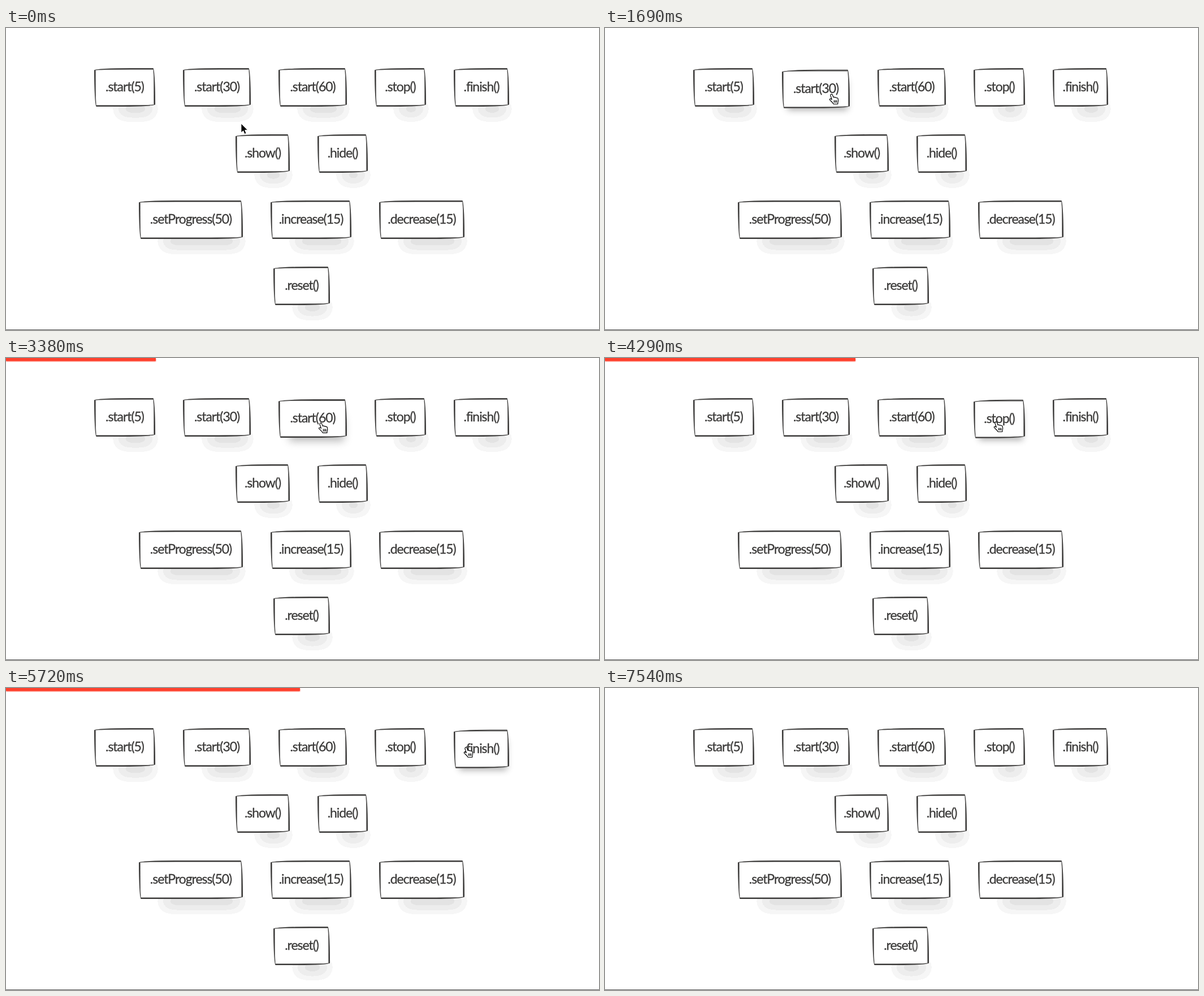
An HTML page for the animation above (7800 ms loop, 1049x534 px).

```html
<!DOCTYPE html>
<html lang="en">
<head>
<meta charset="utf-8">
<title>Progress bar buttons</title>
<style>
  html, body { margin: 0; width: 100%; height: 100%; overflow: hidden; background: #fff; }
  #stage { position: relative; width: 1049px; height: 534px; overflow: hidden; background: #fff; }
  #stage > * { position: absolute; }
  .shade, .btn {
    box-sizing: border-box; height: 68px;
    border-radius: 255px 15px 225px 15px / 15px 225px 15px 255px;
  }
  .btn {
    border: 2px solid #3b3a39; box-shadow: inset 0 0 0 .6px #3b3a39;
    background: #fff; color: #3b3a39;
    font: 23px/60px Lato, "Open Sans", sans-serif; letter-spacing: -1.05px;
    -webkit-text-stroke: .3px #3b3a39;
    text-align: center; white-space: nowrap;
  }
  #rule { left: 0; top: 533px; width: 100%; height: 1px; background: #5c5c5c; }
  #bar { left: 0; top: 0; height: 5px; background: #fe412d; box-shadow: 0 1px 2px #fe412d; }
  #cursor { left: 0; top: 0; overflow: visible; }
</style>
</head>
<body>
<div id="stage">
  <svg width="0" height="0">
    <filter id="bands" x="-100" y="-100" width="500" height="300" filterUnits="userSpaceOnUse">
      <feComponentTransfer><feFuncA id="levels" type="discrete"/></feComponentTransfer>
    </filter>
  </svg>
  <div id="rule"></div>
  <div id="bar"></div>
  <svg id="cursor" width="20" height="22" stroke-linejoin="round">
    <path id="arrow" fill="#000" stroke="#fff" stroke-width=".8"
      d="M0 0V16L3.7 12.7 6.1 18.4 8.9 17.2 6.6 11.6H11.4Z"/>
    <g id="hand" transform="translate(-5 -1)" stroke="#000" stroke-width="1.2" stroke-linecap="round">
      <path fill="#fff" d="M3.5 1.5C4.5.5 6 .8 6.5 2.3L8 6.5C9 5.7 10.3 6 10.8 7 11.8 6.4 13 6.8 13.4 7.7
        14.6 7.2 16 7.8 16.3 9.3 16.8 12 17 13 16 15.5L15.7 18.5H8.2C7 16 4 13.5 1.8 11.3
        .6 10 2.2 8.6 3.8 9.4L5.3 10.5 3 3.6C2.8 2.8 2.9 2 3.5 1.5Z"/>
      <path fill="none" d="M9.3 12v3.6M11.5 12v3.6M13.6 12v3.6"/>
    </g>
  </svg>
</div>
<script>
const LOOP = 7800, TICK = 130, FADE = 235;
const CENTER = 523.3, TOP = 71, PITCH = 117, GAP = 49, HEIGHT = 68;
const $ = id => document.getElementById(id);
const stage = $('stage');

// button labels with their widths, row by row
const rows = [
  { '.start(5)': 108, '.start(30)': 120, '.start(60)': 121, '.stop()': 91, '.finish()': 98 },
  { '.show()': 96, '.hide()': 89 },
  { '.setProgress(50)': 184, '.increase(15)': 143, '.decrease(15)': 151 },
  { '.reset()': 100 }
];

// pointer moves after its rest at home
const home = { x: 416, y: 169 };
const moves = [
  { start: 130, time: 520, x: 409, y: 167 },
  { start: 800, time: 500, x: 401, y: 117 },
  { start: 2950, time: 820, x: 692, y: 113 },
  { start: 4780, time: 720, x: 814, y: 105 },
  { start: 6600, time: 930, x: 969, y: 551 }
];

const clamp = v => Math.min(1, Math.max(0, v));
const smooth = v => v * v * (3 - 2 * v);
const mix = (a, b, k) => a + (b - a) * k;

function pointer(t) {
  let { x, y } = home;
  for (const m of moves) {
    const k = smooth(clamp((t - m.start) / m.time));
    x = mix(x, m.x, k);
    y = mix(y, m.y, k);
  }
  return { x, y };
}

// soft shadows fall into three flat tones
$('levels').setAttribute('tableValues', Array.from({ length: 160 },
  (_, i) => [2, 7, 14].filter(n => i >= n).length * .037).join(' '));

function place(cls, b) {
  const el = document.createElement('div');
  el.className = cls;
  el.style.cssText = `left:${b.x}px;top:${b.y}px;width:${b.w}px`;
  return stage.insertBefore(el, $('rule'));
}

const buttons = rows.flatMap((row, r) => {
  const items = Object.entries(row);
  const total = items.reduce((sum, [, w]) => sum + w + GAP, -GAP);
  let x = Math.round(CENTER - total / 2);
  return items.map(([label, w]) => {
    const b = { x, y: TOP + PITCH * r, w };
    b.shade = place('shade', b);
    b.face = place('btn', b);
    b.face.textContent = label;
    x += w + GAP;
    return b;
  });
});

function isOver(b, t) {
  const p = pointer(t);
  return p.x >= b.x && p.x <= b.x + b.w && p.y >= b.y && p.y <= b.y + HEIGHT;
}

// share of the last FADE ms spent over the button
function hoverLevel(b, t) {
  const n = 12;
  let hits = 0;
  for (let i = 0; i < n; i++) hits += isOver(b, t - i * FADE / n);
  return smooth(hits / n);
}

function setHover(b, k) {
  if (b.k === k) return;
  b.k = k;
  const [x, y, blur, spread] = [[19, 3], [38, 11], [22, 11], [-26, -7]].map(([a, z]) => mix(a, z, k) + 'px');
  b.shade.style.boxShadow = `${x} ${y} ${blur} ${spread} rgba(0,0,0,${mix(.2, .3, k)})`;
  b.shade.style.filter = k ? 'none' : 'url(#bands)';
  b.shade.style.transform = b.face.style.transform = k ? `translateY(${2.8 * k}px)` : 'none';
}

function drawBar(t) {
  const grown = Math.min(520, Math.max(0, .196 * (t - 2030)));
  const ending = Math.max(0, t - 6500);
  const style = $('bar').style;
  style.display = grown ? '' : 'none';
  style.width = mix(grown, 1049, clamp(ending / 155)) + 'px';
  style.opacity = clamp(1 - ending / 370);
}

function draw(t) {
  for (const b of buttons) setHover(b, hoverLevel(b, t));
  const { x, y } = pointer(t);
  const over = buttons.some(b => isOver(b, t));
  $('cursor').style.transform = `translate(${x}px, ${y}px)`;
  $('arrow').style.display = over ? 'none' : '';
  $('hand').style.display = over ? '' : 'none';
  drawBar(t);
}

function frame() {
  const t = performance.now() % LOOP;
  draw(Math.floor(t / TICK) * TICK);
  requestAnimationFrame(frame);
}
frame();
</script>
</body>
</html>
```
